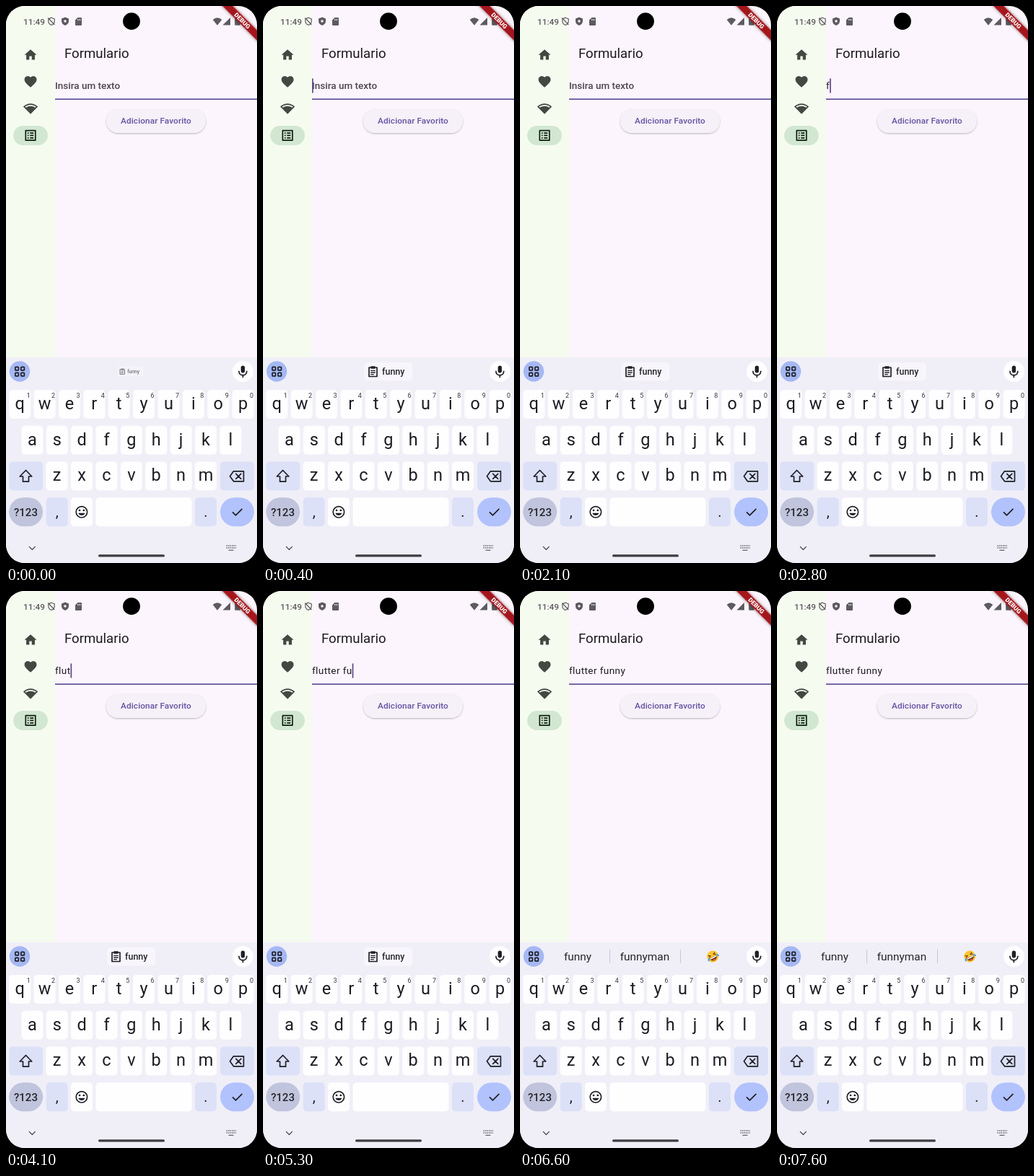
An HTML page for the animation above (8 s loop, 348 by 772 pixels).

```html
<!DOCTYPE html>
<html lang="pt">
<head>
<meta charset="utf-8">
<title>Formulario</title>
<style>
  html, body { margin: 0; width: 100%; height: 100%; overflow: hidden; background: #000; }
  svg { display: block; width: 348px; height: 772px; border-radius: 26px; background: #fdf5fd; }
  text { font-family: Roboto, "Noto Sans", sans-serif; white-space: pre; }
  .mid { text-anchor: middle; }
  .key { font-size: 23.5px; fill: #1c1c22; }
  .digit { font-size: 9px; fill: #33333a; }
  .field { font-size: 13.5px; letter-spacing: .42px; fill: #1d1b20; }
  .label { font-size: 13.5px; font-weight: 500; fill: #4b464f; }
  .word { font-size: 15.4px; fill: #25252b; }
  .line { fill: none; stroke: #1f1f26; stroke-width: 1.7; stroke-linejoin: round; stroke-linecap: round; }
  #chip { transform-origin: 172px 506.5px; }
</style>
</head>
<body>
<svg viewBox="0 0 348 772" xmlns="http://www.w3.org/2000/svg">
  <defs>
    <filter id="soft" x="-20%" y="-40%" width="140%" height="190%">
      <feDropShadow dx="0" dy="1" stdDeviation=".9" flood-color="#000" flood-opacity=".28"/>
    </filter>
    <filter id="glow" x="-20%" y="-60%" width="140%" height="220%">
      <feDropShadow dx="0" dy="0" stdDeviation="2" flood-color="#000" flood-opacity=".5"/>
    </filter>
  </defs>

  <rect width="68" height="487" fill="#f6fbf0"/>

  <!-- status bar -->
  <g fill="#5d5a60">
    <text x="24" y="25.6" font-size="11.8" font-weight="500">11:49</text>
    <path d="M63 16.2l4.2 1.7v3.2c0 2.6-1.8 4.5-4.2 5.4-2.400-.9-4.200-2.800-4.200-5.400v-3.200z" fill="none" stroke="#5d5a60" stroke-width="1.200"/>
    <path d="M58.300 16.500l9 9.500" stroke="#5d5a60" stroke-width="1.200"/>
    <path d="M82 15.500l5 2v3.600c0 2.900-2.100 5.100-5 6-2.900-.9-5-3.100-5-6v-3.600z"/>
    <circle cx="82" cy="21" r="1.700" fill="#fdf5fd"/>
    <path d="M99.500 16h4.500q1 0 1 1v9q0 1-1 1h-7q-1 0-1-1v-6.500z"/>
    <path d="M99.600 18v2.200M101.400 18v2.200M103.200 18v2.200" stroke="#fdf5fd" stroke-width=".8"/>
    <path d="M293 26.700l-6.300-7.700q6.300-5.400 12.600 0z"/>
    <path d="M311 16v10.500h-10.500z"/>
    <path d="M319.500 15.500h3v1h1.500q.8 0 .8.800v8.700q0 .8-.8.800h-6q-.8 0-.8-.8v-8.700q0-.8.800-.8h1.500z"/>
  </g>
  <circle cx="174" cy="21.200" r="11.900"/>

  <!-- rail -->
  <rect x="10" y="166" width="48" height="27" rx="13.500" fill="#d2e7d1"/>
  <g fill="#424842">
    <path transform="translate(23.900 57.600) scale(.845)" d="M10 20v-6h4v6h5v-8h3L12 3 2 12h3v8z"/>
    <path transform="translate(23.900 94.700) scale(.845)" d="M12 21.350l-1.450-1.320C5.400 15.360 2 12.280 2 8.500 2 5.420 4.420 3 7.500 3c1.740 0 3.410.81 4.500 2.090C13.090 3.810 14.760 3 16.500 3 19.580 3 22 5.420 22 8.500c0 3.780-3.400 6.860-8.550 11.540z"/>
    <path transform="translate(23.900 131.900) scale(.845)" d="M24 8.980C20.930 5.900 16.690 4 12 4S3.070 5.900 0 8.980L12 21zM2.920 9.070C5.510 7.080 8.670 6 12 6s6.490 1.080 9.080 3.070l-1.430 1.430C17.500 8.940 14.860 8 12 8s-5.500.94-7.650 2.510z"/>
    <path fill="#0f1f13" transform="translate(23.900 169.300) scale(.845)" d="M19 5v14H5V5h14m1.100-2H3.900c-.5 0-.9.4-.9.9v16.200c0 .4.4.9.9.9h16.200c.4 0 .9-.5.9-.9V3.900c0-.5-.5-.9-.9-.9zM11 7h6v2h-6zm0 4h6v2h-6zm0 4h6v2h-6zM7 7h2v2H7zm0 4h2v2H7zm0 4h2v2H7z"/>
  </g>

  <!-- form -->
  <text x="81" y="72.200" font-size="18.600" fill="#1d1b20">Formulario</text>
  <text id="label" class="label" x="68" y="114.700">Insira um texto</text>
  <text id="field" class="field" x="68" y="114.700"></text>
  <rect id="cursor" y="100.500" width="1.700" height="20" fill="#594a86"/>
  <rect x="68" y="128.300" width="280" height="1.700" fill="#614f99"/>
  <rect x="139" y="143" width="138" height="33" rx="16.500" fill="#f6f0f9" filter="url(#soft)"/>
  <text class="mid" x="208" y="163.400" font-size="11.830" font-weight="500" letter-spacing=".08" fill="#6652a0">Adicionar Favorito</text>

  <g transform="translate(348 0) rotate(45)">
    <rect x="-50" y="23.700" width="100" height="10.100" fill="#a5161f" filter="url(#glow)"/>
    <text class="mid" y="31.800" font-size="8.600" font-weight="900" fill="#fff">DEBUG</text>
  </g>

  <!-- keyboard -->
  <rect y="487" width="348" height="285" fill="#f0eff8"/>
  <circle cx="19" cy="506.500" r="14.200" fill="#a5b8f3"/>
  <g class="line" stroke-width="1.400">
    <rect x="12.800" y="500.300" width="4.600" height="4.600" rx="1"/>
    <rect x="20.800" y="500.300" width="4.600" height="4.600" rx="1"/>
    <rect x="12.800" y="508.300" width="4.600" height="4.600" rx="1"/>
    <rect x="20.800" y="508.300" width="4.600" height="4.600" rx="1"/>
  </g>
  <circle cx="328.500" cy="506.500" r="14.500" fill="#fefdff"/>
  <rect x="325.700" y="498.500" width="5.400" height="10" rx="2.700" fill="#1f1f26"/>
  <path class="line" d="M323 506.300c0 7.200 10.800 7.200 10.800 0M328.400 511.800v2.700"/>

  <g id="chip">
    <rect x="140.500" y="494" width="66.500" height="25.500" rx="5" fill="#f8f6fc"/>
    <path class="line" stroke-width="1.500" d="M147 501h11v12.500h-11z"/>
    <path d="M149.500 499.300h6v3.500h-6z" fill="#1f1f26"/>
    <path class="line" style="stroke-width:1.300" d="M149.700 505.300h5.600M149.700 508h5.600M149.700 510.700h3.600"/>
    <text x="165" y="511" font-size="12.500" font-weight="500" fill="#25252b">funny</text>
  </g>
  <g id="words">
    <path d="M124.500 497v19M222.500 497v19" stroke="#c8c7d1"/>
    <text class="word mid" x="80" y="512"></text>
    <text class="word mid" x="173" y="512"></text>
    <text class="word mid" x="266.300" y="512"></text>
  </g>
  <g id="laugh" transform="translate(267.200 506.500) rotate(-28)">
    <circle r="8" fill="#fcc62f"/>
    <path d="M-5 .8h10c0 7-10 7-10 0z" fill="#6b3519"/>
    <path d="M-4.300 1h8.600v1.500h-8.600z" fill="#fff"/>
    <path d="M-2.800 4.500q2.800-1.700 5.600 0-2.800 2.400-5.600 0z" fill="#ee5a52"/>
    <path d="M-5.300-4l3 1.800-3 1.500M5.300-4l-3 1.800 3 1.500" fill="none" stroke="#6b3519" stroke-width="1.100"/>
    <path d="M-5-.6q-4 .8-3.500 4 2.700 1 3.500-4zM5-.6q4 .8 3.500 4-2.700 1-3.500-4z" fill="#46a5ee"/>
  </g>

  <g id="keys"></g>

  <path class="line" d="M27.500 643.500l8.300 8.500h-4.300v7.200h-8v-7.200h-4.300z"/>
  <path class="line" d="M315.500 644.800h14v14h-14l-5-7z M318.800 648.300l7 7M325.800 648.300l-7 7"/>
  <circle class="line" cx="104.900" cy="701.300" r="7.700"/>
  <circle cx="102" cy="699" r="1.300"/><circle cx="107.800" cy="699" r="1.300"/>
  <path d="M100.400 702.800h9c-1.200 4.400-7.800 4.400-9 0z" fill="#1f1f26"/>
  <path class="line" d="M314.500 701.800l4 4 8.500-8.500"/>

  <path class="line" style="stroke:#55555c;stroke-width:1.300" d="M32.300 749.500l4 4 4-4"/>
  <g fill="none" stroke="#66666e">
    <path stroke-dasharray="1.500 1" stroke-width="1.500" d="M305.500 748h13.500M305.500 751h13.500"/>
    <path stroke-width="1.300" d="M308.500 754.300h7"/>
  </g>
  <rect x="128" y="760.300" width="92" height="3.200" rx="1.600" fill="#3e3d43"/>
</svg>

<script>
const LOOP = 8000;
const $ = id => document.getElementById(id);
const NS = 'http://www.w3.org/2000/svg';

function add(tag, attrs, content = '') {
  const node = document.createElementNS(NS, tag);
  for (const name in attrs) node.setAttribute(name, attrs[name]);
  node.textContent = content;
  $('keys').append(node);
}

function key(x, y, width, fill = '#fefdff', rx = 5) {
  add('rect', { x, y, width, height: 40, rx, fill });
}

const PITCH = 34.38;
const TONE = '#dce1f8';

function letters(row, first, y) {
  [...row].forEach((ch, i) => {
    const cx = first + i * PITCH;
    key(cx - 15, y, 30);
    add('text', { class: 'key mid', x: cx, y: y + 26.8 }, ch);
    if (row.length === 10) {
      add('text', { class: 'digit mid', x: cx + 12, y: y + 11 }, (i + 1) % 10);
    }
  });
}

letters('qwertyuiop', 19.2, 532);
letters('asdfghjkl', 36.4, 581.7);
letters('zxcvbnm', 70.7, 631.4);
key(4.2, 631.4, 47, TONE);
key(297, 631.4, 47, TONE);
key(4.2, 681.2, 47, '#c0c4dc', 20);
key(55.7, 681.2, 30, TONE);
key(90, 681.2, 30);
key(124.5, 681.2, 133);
key(262, 681.2, 30, TONE);
key(297, 681.2, 47, '#b2c2fc', 20);
add('text', { class: 'mid', x: 27.5, y: 706.7, 'font-size': 15, 'font-weight': 500, fill: '#25252b' }, '?123');
add('text', { class: 'key mid', x: 70.7, y: 708, style: 'font-size:20px' }, ',');
add('text', { class: 'key mid', x: 277, y: 708, style: 'font-size:20px' }, '.');

// When each next letter of the phrase is typed, in ms
const PHRASE = 'flutter funny';
const TYPED = [2800, 3200, 3600, 4100, 4300, 4400, 4600, 4900, 5200, 5300, 5700, 5900, 6100];
const BLINK = 500;
const BLINK_START = 300;

const words = $('words').querySelectorAll('text');
const show = (node, on) => { node.style.display = on ? '' : 'none'; };

function draw(t) {
  const count = TYPED.filter(at => at <= t).length;
  const field = $('field');
  field.textContent = PHRASE.slice(0, count);
  show($('label'), !count);

  const since = t - (count ? TYPED[count - 1] : BLINK_START);
  show($('cursor'), since >= 0 && Math.floor(since / BLINK) % 2 === 0);
  $('cursor').setAttribute('x', 68 + (count ? field.getComputedTextLength() : 0));

  const grow = Math.min(1, t / 300);
  const ease = 1 - (1 - grow) ** 2;
  $('chip').style.transform = `scale(${0.54 + 0.46 * ease})`;
  $('chip').style.opacity = 0.6 + 0.4 * ease;

  const suggest = t >= 6000, done = t >= 6300;
  show($('chip'), !suggest);
  show($('words'), suggest);
  show($('laugh'), done);
  const list = done ? ['funny', 'funnyman', ''] : ['funn', 'funny', 'funnel'];
  words.forEach((node, i) => { node.textContent = list[i]; });
}

const start = performance.now();
function tick() {
  draw((performance.now() - start) % LOOP);
  requestAnimationFrame(tick);
}
tick();
</script>
</body>
</html>
```
